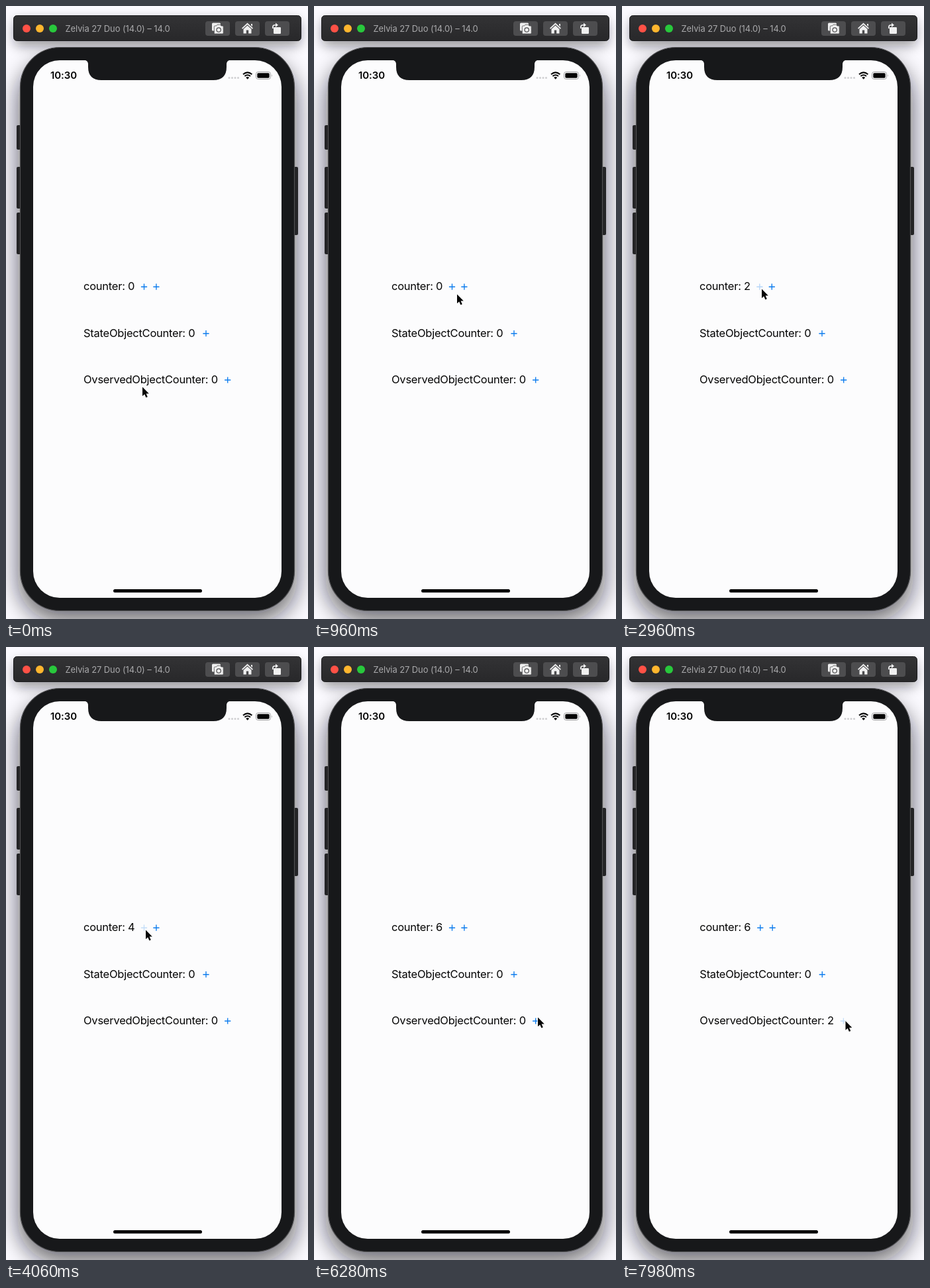
Recreate the animation shown at these times as an HTML page. Size 456 px wide and 926 px high, loop 8 s.

```html
<!DOCTYPE html>
<html lang="en">
<head>
<meta charset="utf-8">
<title>Counters</title>
<style>
  html, body { margin: 0; width: 100%; height: 100%; overflow: hidden; background: #fbfaff; }
  svg { display: block; width: 100vw; height: 100vh; }
  text { font-family: Inter, Roboto, sans-serif; }
  .row { font-size: 16.5px; letter-spacing: -.25px; fill: #050505; }
  .plus { fill: none; stroke: #0c7cee; stroke-width: 1.35; }
  .icon { fill: #f0f0f0; }
  .tool { fill: #4d4d4f; }
</style>
</head>
<body>
<svg viewBox="0 0 456 926" preserveAspectRatio="none">
  <defs>
    <filter id="soft" x="-30%" y="-30%" width="160%" height="160%"><feGaussianBlur stdDeviation="17"/></filter>
    <filter id="barSoft" x="-20%" y="-150%" width="140%" height="400%"><feGaussianBlur stdDeviation="9"/></filter>
    <linearGradient id="bar" x2="0" y2="1">
      <stop stop-color="#333335"/><stop offset="1" stop-color="#28282a"/>
    </linearGradient>
  </defs>

  <rect width="456" height="926" fill="#fbfaff"/>
  <rect x="18" y="80" width="421" height="850" rx="64" fill="#101014" opacity=".6" filter="url(#soft)"/>
  <rect x="13" y="22" width="431" height="38" rx="6" fill="#101014" opacity=".42" filter="url(#barSoft)"/>

  <!-- window bar -->
  <rect x="11.5" y="14.5" width="434" height="38" rx="5" fill="url(#bar)" stroke="#1c1c1e"/>
  <circle cx="31" cy="34" r="6" fill="#ff5146"/>
  <circle cx="51" cy="34" r="6" fill="#ffb62e"/>
  <circle cx="71" cy="34" r="6" fill="#28c83c"/>
  <text x="89.5" y="38.7" font-size="13" letter-spacing="-.1" fill="#a9a9ab">Zelvia 27 Duo (14.0) – 14.0</text>
  <rect class="tool" x="301" y="23" width="37" height="22" rx="4"/>
  <rect class="tool" x="346" y="23" width="37" height="22" rx="4"/>
  <rect class="tool" x="391" y="23" width="37" height="22" rx="4"/>
  <g class="icon">
    <rect x="311" y="25.5" width="13" height="12" rx="1.5"/>
    <path d="M315.5 30h2l1.5-1.8h4.500L325 30h2q1.200 0 1.200 1.200v9.600q0 1.200-1.200 1.200h-11.500q-1.200 0-1.200-1.200v-9.600q0-1.200 1.200-1.200z" stroke="#4d4d4f" stroke-width=".8"/>
    <circle cx="321.200" cy="36" r="3.200" fill="none" stroke="#4d4d4f" stroke-width="1.200"/>
    <path d="M364.500 25.500l8.500 8-1.200 1.200-7.300-6.800-7.300 6.800-1.200-1.200zM370 27h2v4l-2-2z"/>
    <path d="M364.500 29.500l6 5.500v6.500h-4.300v-5h-3.400v5h-4.300V35z"/>
    <rect x="404" y="32" width="11" height="10" rx="1.200"/>
    <path d="M402 34v-2q0-4 4-4h1v-2.500l4 3.300-4 3.300v-2.500h-1q-2.300 0-2.300 2.400v2z"/>
  </g>

  <!-- device -->
  <g fill="#242426">
    <rect x="16" y="180" width="9" height="37" rx="2"/>
    <rect x="16" y="243" width="9" height="63" rx="2"/>
    <rect x="16" y="312" width="9" height="63" rx="2"/>
    <rect x="432" y="243" width="9" height="103" rx="2"/>
  </g>
  <rect x="21.5" y="62.5" width="414" height="851" rx="60" fill="#17181a" stroke="#505052" stroke-width="1.2"/>
  <rect x="41" y="82" width="375" height="812" rx="40" fill="#fcfcfd"/>
  <path d="M118 81.500q6 .5 6 7v3.500q0 20 20 20h169q20 0 20-20v-3.500q0-6.500 6-7z" fill="#17181a"/>
  <rect x="162" y="881" width="134" height="5" rx="2.500" fill="#050505"/>

  <!-- status -->
  <text x="67" y="110.300" font-size="15" font-weight="600" letter-spacing="-.1" fill="#050505">10:30</text>
  <g fill="#cfcfd1">
    <circle cx="337" cy="108.500" r="1.500"/><circle cx="341.500" cy="108.500" r="1.500"/>
    <circle cx="346" cy="108.500" r="1.500"/><circle cx="350.500" cy="108.500" r="1.500"/>
  </g>
  <g fill="none" stroke="#050505" stroke-width="2.100">
    <path d="M358 103.200q6.700-5.600 13.400 0M360.400 106q4.300-3.500 8.600 0"/>
  </g>
  <path d="M362.200 108q2.500-1.800 5 0l-2.500 2.700z" fill="#050505"/>
  <rect x="377.500" y="99.500" width="22" height="11" rx="3.200" fill="none" stroke="#a2a2a4"/>
  <rect x="379.300" y="101.300" width="18.400" height="7.400" rx="1.700" fill="#050505"/>
  <path d="M401 103.200q1.600 1.800 0 3.700z" fill="#a2a2a4"/>

  <g id="list"></g>
  <path id="pointer" d="M0 0V13.800L3.200 10.900 5.400 16 7.800 15 5.600 10H9.800Z" fill="#050505" stroke="#fff" stroke-width="1.600" paint-order="stroke" stroke-linejoin="round"/>
</svg>
<script>
const LOOP = 8000, PRESS = 110, FADE = 260;
const BEAT = 140; // three steps: 20, 100 and 20 ms long
const NS = 'http://www.w3.org/2000/svg';
const list = document.getElementById('list');
const pointer = document.getElementById('pointer');

// digit width relative to zero
const digitShift = [0, -2.8, -.6, -.4, 0, -.4, 0];

const rows = [
  { label: 'counter: ', y: 429.2, plus: [208.5, 226.9], taps: [2380, 2930, 3480, 4030, 4580, 5080] },
  { label: 'StateObjectCounter: ', y: 499.7, plus: [302], taps: [] },
  { label: 'OvservedObjectCounter: ', y: 570, plus: [334.7], taps: [7400, 7950] }
];

// time, x, y
const track = [
  [0, 206, 575.5], [120, 206, 575.5], [900, 216, 435.5], [1000, 216, 435.5],
  [1400, 211, 427.5], [5300, 211, 427.5], [6200, 338, 559.5],
  [6300, 338, 559.5], [6600, 337.5, 565]
];

function add(tag, attrs) {
  const el = document.createElementNS(NS, tag);
  for (const key in attrs) el.setAttribute(key, attrs[key]);
  return list.appendChild(el);
}

for (const row of rows) {
  row.text = add('text', { class: 'row', x: 117, y: row.y });
  row.signs = row.plus.map(() => add('path', { class: 'plus', d: 'M-4.6 0H4.6M0-4.6V4.6' }));
}

const ease = p => p * p * (3 - 2 * p);

function recorded(t) {
  const rest = t % BEAT;
  const step = rest < 20 ? 0 : rest < 120 ? 1 : 2;
  return t - rest + step * BEAT / 3;
}

function pointerAt(t) {
  const i = track.findIndex(k => k[0] > t);
  if (i < 0) return track[track.length - 1].slice(1);
  const a = track[i - 1], b = track[i];
  const p = ease((t - a[0]) / (b[0] - a[0]));
  return [a[1] + (b[1] - a[1]) * p, a[2] + (b[2] - a[2]) * p];
}

function signOpacity(taps, t) {
  const tap = taps.find(k => t >= k - PRESS && t < k + FADE);
  if (tap === undefined) return 1;
  return t < tap ? .2 : .2 + .8 * ease((t - tap) / FADE);
}

function draw(t) {
  for (const row of rows) row.value = row.taps.filter(k => k <= t).length;
  // the stack stays centred on its widest row
  const dx = -digitShift[rows[2].value] / 2;
  list.setAttribute('transform', `translate(${dx} 0)`);
  for (const row of rows) {
    row.text.textContent = row.label + row.value;
    row.signs.forEach((sign, i) => {
      const x = row.plus[i] + digitShift[row.value];
      sign.setAttribute('transform', `translate(${x} ${row.y - 5})`);
      sign.setAttribute('opacity', i ? 1 : signOpacity(row.taps, t));
    });
  }
  pointer.setAttribute('transform', `translate(${pointerAt(t).join(' ')})`);
}

const start = performance.now();
function tick() {
  draw(recorded((performance.now() - start) % LOOP));
  requestAnimationFrame(tick);
}
tick();
</script>
</body>
</html>
```
